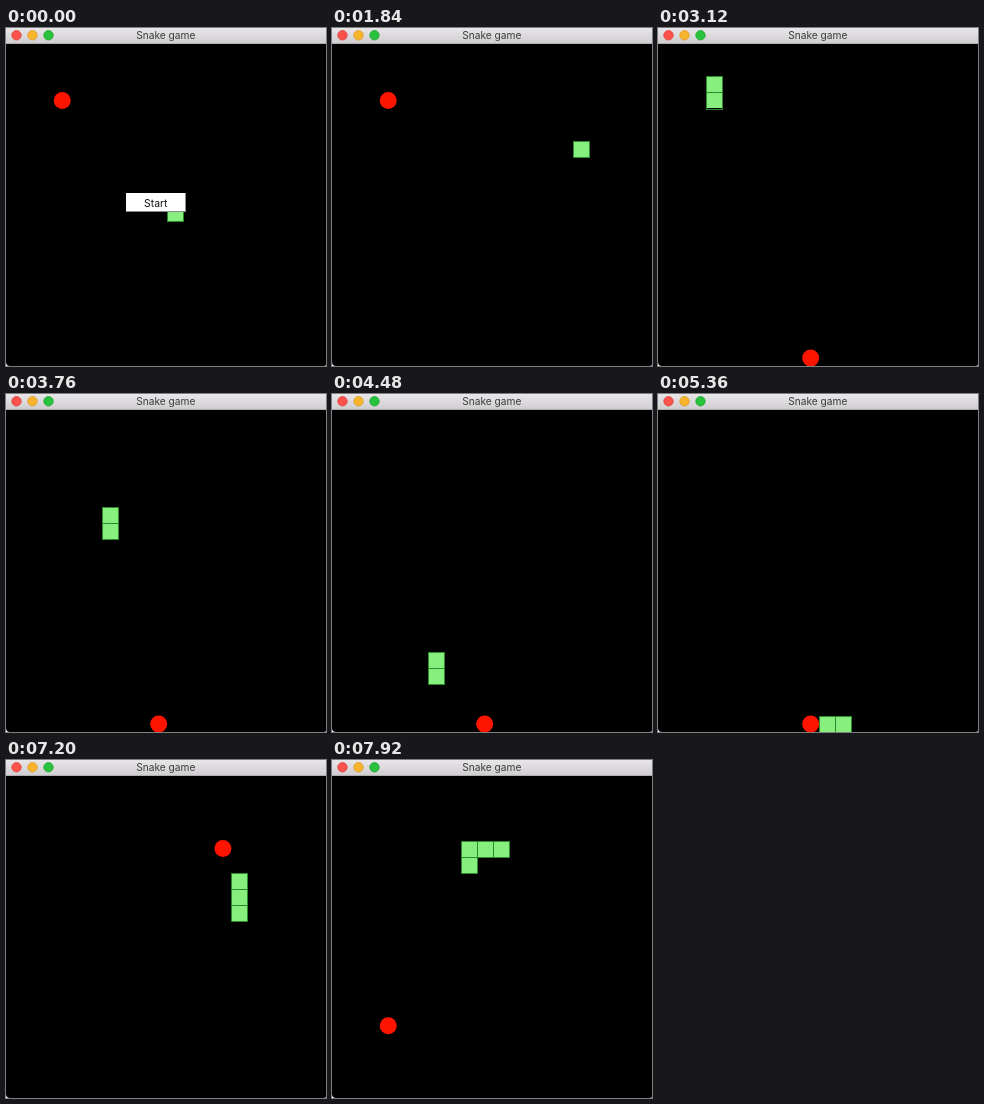
These frames come from a looping animation (320 px wide and 338 px high, 8000 ms). An HTML page with a canvas:

```html
<!DOCTYPE html>
<html lang="en">
<head>
<meta charset="utf-8">
<title>Snake game</title>
<style>
  html, body { margin: 0; width: 100%; height: 100%; overflow: hidden; background: #fff; }
  canvas { display: block; }
</style>
</head>
<body>
<canvas id="stage" width="320" height="338"></canvas>
<script>
const ctx = document.getElementById('stage').getContext('2d');
const LOOP = 8000, START = 1200, STEP = 80;
const CELL_W = 16.07, CELL_H = 16.1, TOP = 16.1;
const FONT = 'Inter, Roboto, sans-serif';
const DIRS = { R: [1, 0], L: [-1, 0], U: [0, -1], D: [0, 1] };
const apples = [[3, 3], [9, 19], [13, 4], [3, 15]];

// Head positions, one per step, from a list of turns and run lengths.
const trail = [[10, 10]];
for (const [, dir, run] of 'R5U5L12U3R3D16R6D1L5U4R7U11L6D1'.matchAll(/([RLUD])(\d+)/g)) {
  for (let i = 0; i < +run; i++) {
    const [x, y] = trail[trail.length - 1];
    trail.push([x + DIRS[dir][0], y + DIRS[dir][1]]);
  }
}

// Number of apples eaten by each step.
let eatenSoFar = 0;
const eaten = trail.map(([x, y]) => {
  const apple = apples[eatenSoFar];
  if (x === apple[0] && y === apple[1]) eatenSoFar++;
  return eatenSoFar;
});

const left = col => Math.round(col * CELL_W);
const top_ = row => Math.round(TOP + row * CELL_H);

function text(label, x, y, size, color) {
  ctx.font = `${size}px ${FONT}`;
  ctx.textAlign = 'center';
  ctx.textBaseline = 'alphabetic';
  ctx.fillStyle = color;
  ctx.fillText(label, x, y);
}

function disc(x, y, r, fill, stroke) {
  ctx.beginPath();
  ctx.arc(x, y, r, 0, Math.PI * 2);
  ctx.fillStyle = fill;
  ctx.fill();
  if (stroke) {
    ctx.strokeStyle = stroke;
    ctx.lineWidth = 0.8;
    ctx.stroke();
  }
}

function drawWindow() {
  ctx.fillStyle = '#fff';
  ctx.fillRect(0, 0, 320, 338);
  ctx.fillStyle = '#000';
  ctx.beginPath();
  ctx.roundRect(0, 15, 321.4, 323, [0, 0, 4, 4]);
  ctx.fill();

  const bar = ctx.createLinearGradient(0, 0, 0, 15);
  bar.addColorStop(0, '#e8e6e8');
  bar.addColorStop(1, '#d0ced0');
  ctx.fillStyle = bar;
  ctx.fillRect(0, 0, 320, 15);
  ctx.fillStyle = '#b0aeb0';
  ctx.fillRect(0, 15, 320, 1);

  disc(10.5, 7.3, 4.7, '#fc524c', '#de3f3a');
  disc(26.5, 7.3, 4.7, '#f8b42c', '#dc9a22');
  disc(42.5, 7.3, 4.7, '#28c23c', '#1ba42e');
  text('Snake game', 159.8, 11.4, 10.2, '#3c3c3c');
}

function drawApple([col, row]) {
  disc((col + 0.5) * CELL_W, TOP + (row + 0.5) * CELL_H, 8.5, '#ff1400');
}

function drawCell([col, row]) {
  const x = left(col), y = top_(row);
  ctx.fillStyle = '#86ef7e';
  ctx.fillRect(x, y, 16, 16);
  ctx.strokeStyle = '#2c8a2c';
  ctx.lineWidth = 1;
  ctx.strokeRect(x + 0.5, y + 0.5, left(col + 1) - x, top_(row + 1) - y);
}

function drawButton() {
  ctx.fillStyle = '#8c8c8c';
  ctx.fillRect(120, 165, 60, 19);
  ctx.fillStyle = '#fff';
  ctx.fillRect(120, 165, 59, 18);
  text('Start', 149.8, 178.6, 10.4, '#111');
}

function draw() {
  const t = (performance.now() - began) % LOOP;
  const step = t < START ? 0 : Math.floor((t - START) / STEP) + 1;
  const length = eaten[step] + 1;
  drawWindow();
  drawApple(apples[eaten[step]]);
  trail.slice(Math.max(0, step + 1 - length), step + 1).forEach(drawCell);
  if (step === 0) drawButton();
  requestAnimationFrame(draw);
}

const began = performance.now();
draw();
</script>
</body>
</html>
```
